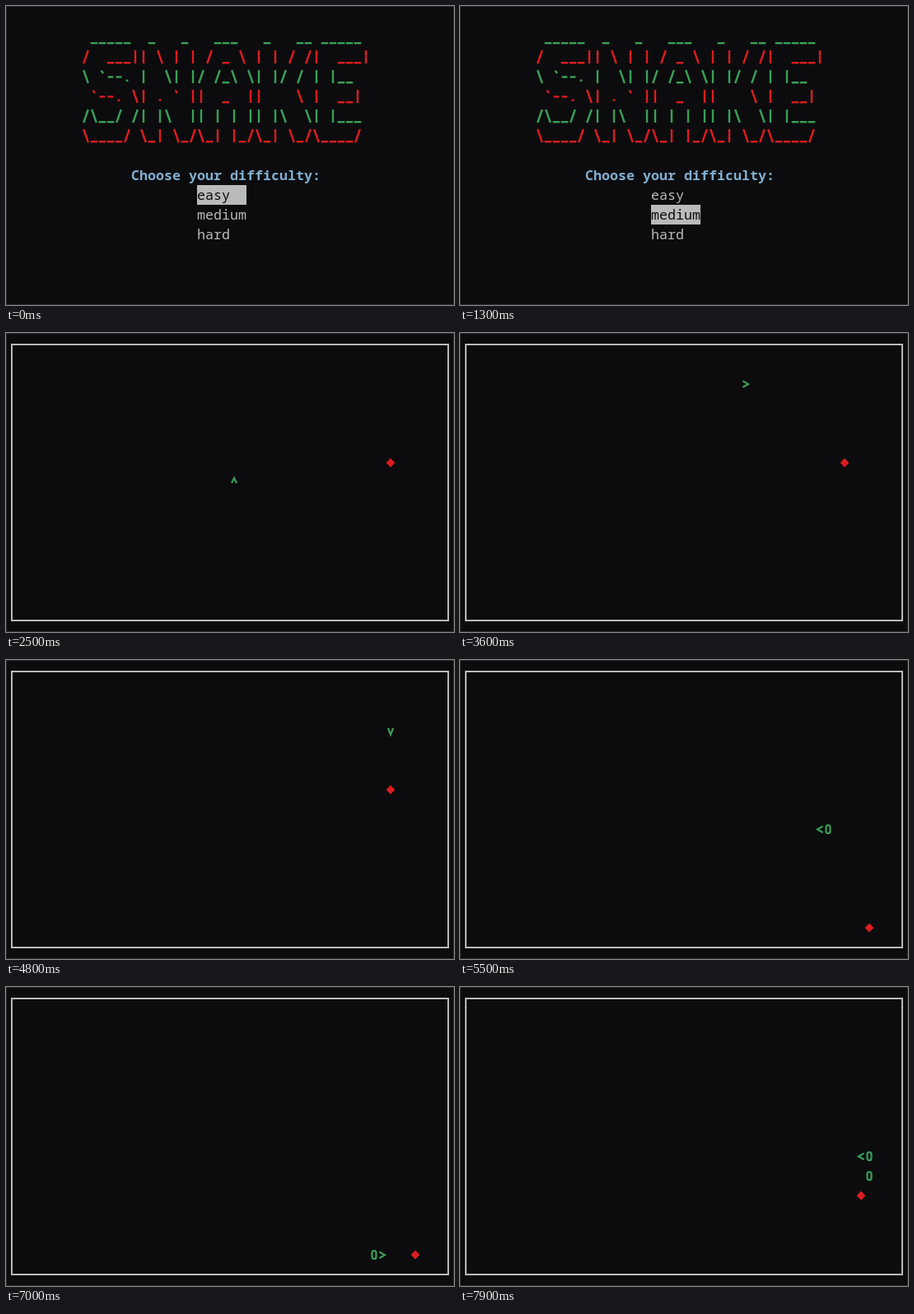
Recreate the animation shown at these times as an HTML page with a canvas. Size 544 by 364 pixels, loop 8 s.

```html
<!DOCTYPE html>
<html lang="en">
<head>
<meta charset="utf-8">
<title>Terminal snake</title>
<style>
html, body { margin: 0; width: 544px; height: 364px; overflow: hidden; background: #0c0c0e; }
canvas { display: block; }
</style>
</head>
<body>
<canvas width="544" height="364"></canvas>
<script>
const ctx = document.querySelector('canvas').getContext('2d');
const LOOP = 8000, GAME_START = 2500, TICK = 100;
const CELL_W = 10, CELL_H = 24, PAD = 2;
const BG = '#0c0c0e', EDGE = '#2b2c2e', GREY = '#b9babb';
const RED = '#dc1c20', GREEN = '#3a9f58', BLUE = '#82aed0';

const TITLE = [
  ' _____  _   _   ___   _   __ _____',
  '/  ___|| \\ | | / _ \\ | | / /|  ___|',
  '\\ `--. |  \\| |/ /_\\ \\| |/ / | |__',
  ' `--. \\| . ` ||  _  ||    \\ |  __|',
  '/\\__/ /| |\\  || | | || |\\  \\| |___',
  '\\____/ \\_| \\_/\\_| |_/\\_| \\_/\\____/'
];
const LEVELS = ['easy', 'medium', 'hard'];

// Stroked symbols, each drawn inside one 10 x 24 cell
const GLYPHS = {
  '|': 'M5 4V20',
  '/': 'M2.2 20L7.8 4',
  '\\': 'M2.2 4L7.8 20',
  '_': 'M.7 19.2H9.3',
  '-': 'M1.6 12.4H8.4',
  '.': 'M3.6 16.7H6.4',
  '`': 'M3.6 4.6L6 8',
  '^': 'M2 12.7L5 6.5L8 12.7',
  'v': 'M1.9 8.8L5 16.8L8.1 8.8',
  '>': 'M1.4 8.4L8 12.2L1.4 16',
  '<': 'M8.6 8.4L2 12.2L8.6 16',
  'O': 'M5 7C7 7 7.5 8.3 7.5 9.8V14.2C7.5 15.7 7 17 5 17S2.5 15.7 2.5 14.2V9.8C2.5 8.3 3 7 5 7Z'
};
for (const ch in GLYPHS) GLYPHS[ch] = new Path2D(GLYPHS[ch]);

// Moves made in each tick; a turn can squeeze two into one tick
const PATH = ('U U U U UR ' + 'R '.repeat(17) + 'RD D D D D DL ' + 'L '.repeat(6) +
  'D D D D D ' + 'R '.repeat(9) + 'RU - U U U UL').split(' ');
const DIRS = { U: [0, -1, '^'], D: [0, 1, 'v'], L: [-1, 0, '<'], R: [1, 0, '>'] };
const FOODS = [[46, 6], [49, 13], [48, 10]];

const cellX = col => PAD + col * CELL_W;
const cellY = row => PAD + row * CELL_H;

function glyph(ch, col, row, color, width = 2.4) {
  if (!GLYPHS[ch]) return;
  ctx.save();
  ctx.translate(cellX(col), cellY(row));
  ctx.strokeStyle = color;
  ctx.lineWidth = width;
  ctx.stroke(GLYPHS[ch]);
  ctx.restore();
}

function text(str, col, row, color, weight = 400) {
  ctx.font = weight + ' 16.67px "Noto Sans Mono", "DejaVu Sans Mono", monospace';
  ctx.fillStyle = color;
  [...str].forEach((ch, i) => ctx.fillText(ch, cellX(col + i), cellY(row) + 18));
}

function drawMenu(selected) {
  TITLE.forEach((line, r) =>
    [...line].forEach((ch, i) => glyph(ch, 9 + i, r + 1, r % 2 ? RED : GREEN)));
  text('Choose your difficulty:', 15, 8, BLUE, 700);
  LEVELS.forEach((name, i) => {
    const on = i === selected;
    if (on) {
      ctx.fillStyle = GREY;
      ctx.fillRect(cellX(23), cellY(9 + i), 6 * CELL_W, CELL_H);
    }
    text(name, 23, 9 + i, on ? BG : GREY);
  });
}

function play(ticks) {
  let body = [[27, 7]], face = '^', eaten = 0;
  for (const move of PATH.slice(0, ticks).join('').replace('-', '')) {
    const [dx, dy, mark] = DIRS[move];
    const [x, y] = body[0];
    face = mark;
    body.unshift([x + dx, y + dy]);
    if (String(body[0]) === String(FOODS[eaten])) eaten++;
    body = body.slice(0, eaten + 1);
  }
  return { body, face, food: FOODS[eaten] };
}

function drawGame(ticks) {
  const { body, face, food } = play(ticks);
  ctx.strokeStyle = GREY;
  ctx.lineWidth = 2;
  ctx.strokeRect(7, 14, 530, 336);

  const x = cellX(food[0]) + 5, y = cellY(food[1]) + 12;
  ctx.fillStyle = RED;
  ctx.beginPath();
  ctx.moveTo(x, y - 5.4);
  ctx.lineTo(x + 5.4, y);
  ctx.lineTo(x, y + 5.4);
  ctx.lineTo(x - 5.4, y);
  ctx.fill();

  body.forEach(([col, row], i) => glyph(i ? 'O' : face, col, row, GREEN, 2.2));
}

function frame(now) {
  const t = now % LOOP;
  ctx.fillStyle = BG;
  ctx.fillRect(0, 0, 544, 364);
  ctx.strokeStyle = EDGE;
  ctx.lineWidth = 1;
  ctx.strokeRect(.5, .5, 543, 363);
  if (t < GAME_START) drawMenu(t < 1300 ? 0 : t < 1600 ? 1 : t < 2100 ? 2 : 1);
  else drawGame(Math.floor((t - GAME_START) / TICK));
  requestAnimationFrame(frame);
}
requestAnimationFrame(frame);
</script>
</body>
</html>
```
